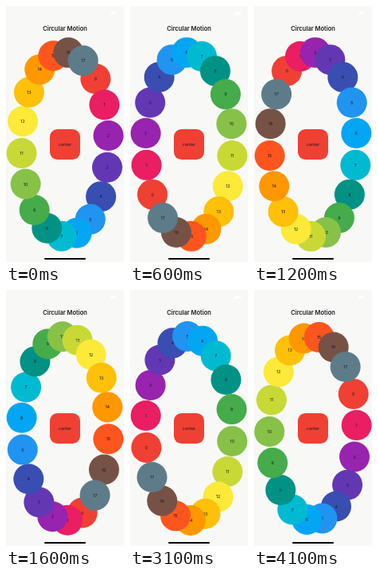
An HTML page for the animation above (4.2 s loop, 148 by 320 pixels).

```html
<!DOCTYPE html>
<html lang="en">
<head>
<meta charset="utf-8">
<title>Circular Motion</title>
<style>
html, body { margin: 0; width: 100%; height: 100%; overflow: hidden; background: #f8f9f7; }
svg { display: block; width: 100%; height: 100%; }
text { font-family: Inter, Roboto, sans-serif; text-anchor: middle; fill: #1d1b20; }
.label { font-size: 5.4px; }
.title { font-size: 7.5px; font-weight: 600; }
</style>
</head>
<body>
<svg viewBox="0 0 148 320" preserveAspectRatio="none">
  <rect width="148" height="320" fill="#f8f9f7"/>
  <rect x="131" y="7.5" width="8" height="3.5" rx="1" fill="#fff"/>
  <text class="title" x="74" y="31">Circular Motion</text>
  <rect x="55" y="154" width="38" height="38" rx="9.5" fill="#f04034"/>
  <text class="label" x="74" y="175">center</text>
  <g id="ring"></g>
  <rect x="48" y="315" width="52" height="2" rx="1" fill="#000"/>
</svg>
<script>
const LOOP = 4200, STEP = 100;
const CX = 74, CY = 173, RX = 54.7, RY = 115, R = 19;
const COLORS = ['#f04034', '#e91e63', '#9823ae', '#6337b4', '#3a4db1', '#2094f0',
  '#03a6f2', '#00bad2', '#009284', '#46ab4b', '#87c148', '#c8d935',
  '#fde938', '#fec009', '#ff9800', '#fe551f', '#765246', '#5e7b89'];

// [time in ms, ring rotation in degrees]
const KEYS = [[0, 44.5], [600, 237], [1200, 323], [1500, 470], [1800, 588],
  [2100, 616], [2500, 617.4], [3000, 617.8], [3100, 618], [3300, 641], [3700, 720], [4100, 788]];

const slopes = KEYS.slice(1).map((k, i) => (k[1] - KEYS[i][1]) / (k[0] - KEYS[i][0]));
const tangents = KEYS.map((_, i) => {
  const a = slopes[i - 1], b = slopes[i];
  if (a === undefined) return b;
  if (b === undefined) return a;
  return 2 * a * b / (a + b);
});

// Monotone cubic interpolation between the keys
function rotation(t) {
  let i = 0;
  while (i < KEYS.length - 2 && t >= KEYS[i + 1][0]) i++;
  const [t0, a0] = KEYS[i], [t1, a1] = KEYS[i + 1];
  const h = t1 - t0, u = (t - t0) / h, v = 1 - u;
  return a0 * (1 + 2 * u) * v * v + a1 * u * u * (3 - 2 * u)
    + h * u * v * (v * tangents[i] - u * tangents[i + 1]);
}

function make(tag, attrs, parent) {
  const el = document.createElementNS('http://www.w3.org/2000/svg', tag);
  for (const name in attrs) el.setAttribute(name, attrs[name]);
  return parent.appendChild(el);
}

const ring = document.getElementById('ring');
const items = COLORS.map((fill, i) => {
  const g = make('g', {}, ring);
  make('circle', { r: R, fill }, g);
  make('text', { class: 'label', y: 2 }, g).textContent = i;
  return g;
});

function draw(t) {
  const turn = rotation(Math.floor(t / STEP) * STEP);
  items.forEach((g, i) => {
    const a = (turn + i * 360 / items.length) * Math.PI / 180;
    const x = CX + RX * Math.sin(a), y = CY - RY * Math.cos(a);
    g.setAttribute('transform', `translate(${x.toFixed(2)} ${y.toFixed(2)})`);
  });
}

const start = performance.now();
function tick() {
  draw((performance.now() - start) % LOOP);
  requestAnimationFrame(tick);
}
tick();
</script>
</body>
</html>
```
